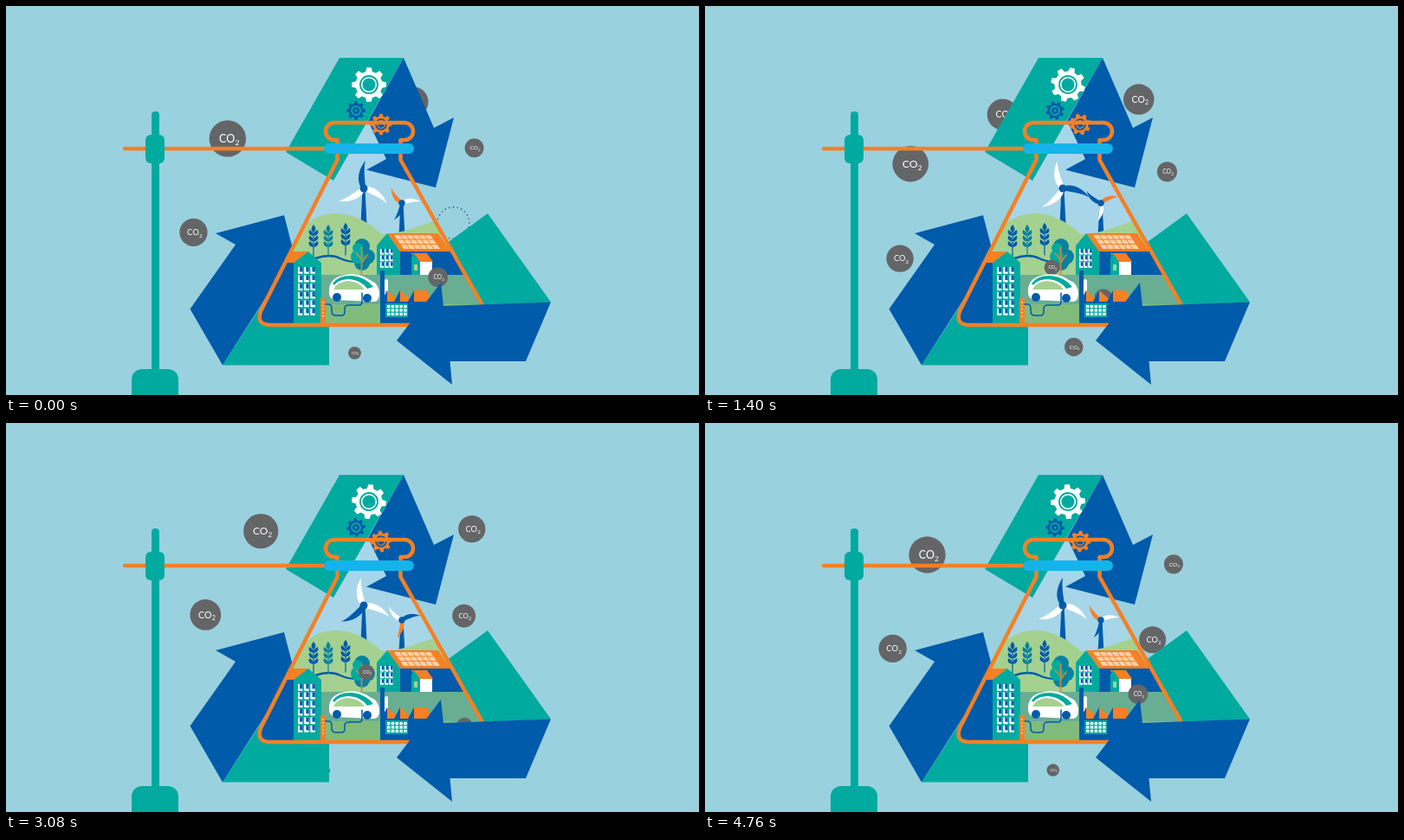
An HTML page with a canvas for the animation above (4800 ms loop, 800 by 450 pixels).

```html
<!DOCTYPE html>
<html lang="en">
<head>
<meta charset="utf-8">
<title>Circular energy flask</title>
<style>
html, body { margin: 0; width: 100%; height: 100%; overflow: hidden; background: #9ad1df; }
canvas { display: block; }
</style>
</head>
<body>
<canvas id="stage" width="800" height="450"></canvas>
<script>
const LOOP = 4800, POP = 420, TAU = Math.PI * 2, DEG = TAU / 360;
const TEAL = '#00aa9f', BLUE = '#005bab', ORANGE = '#f58025', GREY = '#646567',
      SKY = '#9ad1df', GLASS = '#a7d6e8', LEAF = '#a4d190', WHITE = '#fff';
const ctx = document.getElementById('stage').getContext('2d');

// Bubble routes: evenly timed key values; a life may span several loops.
const leftRoute = {
  start: 600, end: 11320, pops: true,
  x: [368, 322, 279, 249.5, 233, 229, 216, 228],
  y: [132, 122, 131, 162, 194, 231, 266, 299],
  r: [17, 20.3, 21, 16.8, 15.5]
};
const rightRoute = {
  start: 0, end: 9580, pops: true,
  x: [470, 500, 533, 544, 535.5, 532, 527, 516.5],
  y: [111, 108, 116, 149, 178, 203.5, 229, 251],
  r: [17.5, 17.2, 11, 12.7, 15.5]
};
const bottomRoute = {
  start: 3000, end: 7300, pops: true,
  x: [370, 396, 420.5, 442], y: [402, 402, 397.5, 381], r: [2.5, 6.3, 10.3, 11]
};
const fieldRoute = {
  start: 2700, end: 6600,
  x: [531, 525, 503, 472.5, 452], y: [358, 338, 314.5, 322, 350], r: [9, 11.3, 10]
};
const treeRoute = {
  start: 300, end: 4400,
  x: [397, 402, 415.5, 437], y: [320, 299, 288.5, 284], r: [8, 9.3, 8]
};

function fill(color, path) {
  ctx.fillStyle = color;
  ctx.fill(new Path2D(path));
}
function line(color, width, path) {
  ctx.strokeStyle = color;
  ctx.lineWidth = width;
  ctx.lineCap = ctx.lineJoin = 'round';
  ctx.stroke(new Path2D(path));
}
function box(color, x, y, w, h, r = 0) {
  ctx.fillStyle = color;
  ctx.beginPath();
  ctx.roundRect(x, y, w, h, r);
  ctx.fill();
}
function disc(color, x, y, r) {
  ctx.fillStyle = color;
  ctx.beginPath();
  ctx.arc(x, y, r, 0, TAU);
  ctx.fill();
}
function ring(color, width, r) {
  ctx.strokeStyle = color;
  ctx.lineWidth = width;
  ctx.beginPath();
  ctx.arc(0, 0, r, 0, TAU);
  ctx.stroke();
}
function panes(x, y, cols, rows, w, h, gap) {
  for (let i = 0; i < cols * rows; i++) {
    const px = x + (i % cols) * (w + gap), py = y + Math.floor(i / cols) * (h + gap);
    box(WHITE, px, py, w, h);
    box(BLUE, px + w * 0.4, py, w * 0.6, h * 0.7);
  }
}
function placed(x, y, angle, scale, draw) {
  ctx.save();
  ctx.translate(x, y);
  ctx.rotate(angle);
  ctx.scale(scale, scale);
  draw();
  ctx.restore();
}

// Catmull-Rom curve through evenly spaced values, u from 0 to 1.
function spline(values, u) {
  const last = values.length - 1;
  const i = Math.min(Math.floor(u * last), last - 1), f = u * last - i;
  const a = values[i], b = values[i + 1];
  const before = values[i - 1] ?? 2 * a - b, after = values[i + 2] ?? 2 * b - a;
  const d = b - a, m = (b - before) / 2, n = (after - a) / 2;
  return a + f * (m + f * (3 * d - 2 * m - n + f * (m + n - 2 * d)));
}
function bubble(x, y, r) {
  disc(GREY, x, y, r);
  ctx.fillStyle = WHITE;
  ctx.font = `${r * 0.59}px Lato, sans-serif`;
  ctx.fillText('CO', x - r * 0.46, y + r * 0.2);
  const width = ctx.measureText('CO').width;
  ctx.font = `${r * 0.4}px Lato, sans-serif`;
  ctx.fillText('2', x - r * 0.45 + width, y + r * 0.36);
}
function burst(x, y, r, age) {
  const radius = r + 2 + 13 * Math.min(age / 330, 1), dots = 24;
  ctx.globalAlpha = 1 - 0.5 * age / POP;
  for (let i = 0; i < dots; i++) {
    const a = i / dots * TAU;
    disc('#1d4f73', x + radius * Math.cos(a), y + radius * Math.sin(a), 0.8);
  }
  ctx.globalAlpha = 1;
}
function stream({ start, end, x, y, r, pops }, time) {
  for (let t = time; t < end + POP; t += LOOP) {
    if (t < start) continue;
    const u = Math.min((t - start) / (end - start), 1);
    const place = [x, y, r].map(values => spline(values, u));
    if (t < end) bubble(...place);
    else if (pops) burst(...place, t - end);
  }
}

function gear(x, y, scale, color, angle, innerRadius, innerWidth) {
  placed(x, y, angle, scale, () => {
    ring(color, 4.5, 13.2);
    ring(color, innerWidth, innerRadius);
    for (let i = 0; i < 8; i++) {
      fill(color, 'M-4 -14L-2.8 -19.8H2.8L4 -14Z');
      ctx.rotate(TAU / 8);
    }
  });
}
function turbine(x, y, height, scale, angle, colors) {
  fill(BLUE, `M${x - 1.5} ${y}H${x + 1.5}L${x + 3.5} ${y + height}H${x - 3.5}Z`);
  colors.forEach((color, i) => placed(x, y, angle + i * TAU / 3, scale, () =>
    fill(color, 'M0 -2C9 -9 23 -5 32 3C22 0 10 2 0 2Z')));
  disc(BLUE, x, y, 4.5 * Math.sqrt(scale));
}
function crop(x, y, color) {
  line(color, 1.2, `M${x} ${y}V${y + 36}`);
  for (let b = y + 12; b < y + 28; b += 6.5)
    fill(color, `M${x} ${b}Q${x - 7} ${b - 1} ${x - 5} ${b - 7}Q${x} ${b - 5} ${x} ${b}
      Q${x} ${b - 5} ${x + 5} ${b - 7}Q${x + 7} ${b - 1} ${x} ${b}Z`);
  fill(color, `M${x} ${y - 1}Q${x + 5} ${y + 4} ${x} ${y + 8}Q${x - 5} ${y + 4} ${x} ${y - 1}Z`);
}

function ground() {
  fill(LEAF, 'M320 280C345 248 362 240 380 240C402 240 418 250 434 264C460 264 478 252 500 248L560 270V375H280Z');
  line(BLUE, 2.5, 'M357 292Q374 286 386 292T418 295');
  box('#68ae92', 364, 311, 196, 35);
  box('#7fbc7c', 290, 345, 270, 30);
  crop(355, 254, BLUE);
  crop(372, 254, '#08819f');
  crop(392, 252, BLUE);
}
function tree() {
  const shade = '#08819f';
  disc(shade, 411, 278, 9);
  disc(shade, 417, 290, 9);
  disc(shade, 411, 297, 9);
  disc(TEAL, 406, 280, 6);
  disc(TEAL, 406, 290, 8);
  line('#c58b42', 1.7, 'M410.5 311V279M410.5 293L404 286M410.5 297L417 288');
}
function farmhouse() {
  box(BLUE, 454, 284, 76, 27);
  fill(ORANGE, 'M440 263H499L513 284H455Z');
  fill('#fbd0a6', 'M448 265H490L501 281H459Z');
  for (let i = 1; i < 6; i++) line(ORANGE, 1, `M${448 + i * 7} 265l11 16`);
  line(ORANGE, 1, 'M451 270H494M455 275.5H498');
  fill(TEAL, 'M428 277L440 263L455 284V311H428Z');
  panes(432, 281, 3, 3, 4.2, 6.6, 1);
  fill(ORANGE, 'M468 286H486L493 296H475Z');
  fill(TEAL, 'M468 311V291L471 286L478 296V311Z');
  box(WHITE, 478, 296, 14, 15);
  box(LEAF, 471, 299, 4, 7);
}
function townhouse() {
  box(BLUE, 290, 297, 43, 70);
  fill(ORANGE, 'M349 284H331L318 297H333Z');
  fill(TEAL, 'M332 297L349 284L364 297V367H332Z');
  panes(337, 302, 3, 6, 5.4, 7.8, 1.8);
  box(ORANGE, 363, 338, 6, 30, 1);
  for (let y = 342; y < 362; y += 4) box('#fbd0a6', 365, y, 2, 1.5);
}
function car() {
  fill(WHITE, 'M373 332Q372 318 384 313Q405 306 420 317Q431 321 431 333Q431 342 424 342L380 340Q373 338 373 332Z');
  fill(TEAL, 'M377 321Q384 311 400 312Q416 314 424 325L417 327Q410 317 396 316Q384 316 379 323Z');
  fill(LEAF, 'M378 328Q382 319 395 318Q408 319 414 328Z');
  disc(BLUE, 382, 337, 5);
  disc(BLUE, 417, 338, 5);
  line(BLUE, 1.5, 'M369 345H372Q376 345 376 350V353Q376 358 381 358H387Q391 358 391 354V350Q391 346 396 346H408Q411 346 411 341V332');
}
function factory() {
  box(BLUE, 432, 306, 5, 62);
  box(WHITE, 437, 316, 4, 24, 2);
  box(BLUE, 432, 341, 58, 27);
  for (const x of [440, 455, 471]) {
    fill(BLUE, `M${x - 7} 342L${x} 329V342Z`);
    fill(ORANGE, `M${x} 329L${x + 15} 342H${x}Z`);
  }
  fill(ORANGE, 'M471 329H486L491 342H471Z');
  box(TEAL, 438, 344, 26, 16);
  for (let i = 0; i < 15; i++)
    box(WHITE, 440 + i % 5 * 4.8, 346 + Math.floor(i / 5) * 4.4, 3.4, 3.2);
}

function draw(time) {
  const turn = time / LOOP * TAU;
  box(SKY, 0, 0, 800, 450);
  stream(leftRoute, time);
  stream(rightRoute, time);
  stream(bottomRoute, time);

  fill(TEAL, 'M250 415.5H373V340H299Z');
  fill(BLUE, 'M321 242L342 323L318 309L250 415.5L212.5 350.5L265 276L242 263Z');
  fill(TEAL, 'M556 240L629 342.5L545 347L508 275Z');

  const glass = 'M383 135H455V178L549.5 345V369H304Q289 368 294 353L383 178Z';
  fill(GLASS, glass);
  fill(TEAL, 'M385 60H459L378 202L323 169Z');
  fill(BLUE, 'M459 60L494 141L517 129L496 210L416 189.5L439 177L418 133Z');

  box(TEAL, 168, 122, 9, 310, 4);
  box(TEAL, 145, 420, 54, 50, 12);
  line(ORANGE, 4.5, 'M137 165H372');
  box(TEAL, 161, 149, 22, 33, 6);

  turbine(413, 211, 42, 1, turn - 92 * DEG, [BLUE, WHITE, WHITE]);
  turbine(457, 228, 38, 0.67, turn - 130 * DEG, [ORANGE, WHITE, BLUE]);

  ctx.save();
  ctx.clip(new Path2D(glass));
  ground();
  tree();
  stream(treeRoute, time);
  farmhouse();
  townhouse();
  ctx.restore();
  stream(fieldRoute, time);
  car();
  factory();

  line(ORANGE, 4.5, 'M470 369H304Q288 368 294.5 352L382.5 178V155H379A10 10 0 0 1 379 135H460A10 10 0 0 1 460 155H455.5V178L549.5 345');
  box('#14b4ea', 367, 159, 104, 12, 6);
  fill(BLUE, 'M629 342.5L600 411H512.5L515 438L451 387L502 320L505 347Z');

  gear(419, 91, 1, WHITE, turn, 8.3, 1.5);
  gear(404, 121, 0.54, BLUE, -turn, 5, 4.5);
  gear(433, 137, 0.62, ORANGE, -turn, 7, 2);
}

function tick() {
  draw(performance.now() % LOOP);
  requestAnimationFrame(tick);
}
tick();
</script>
</body>
</html>
```
